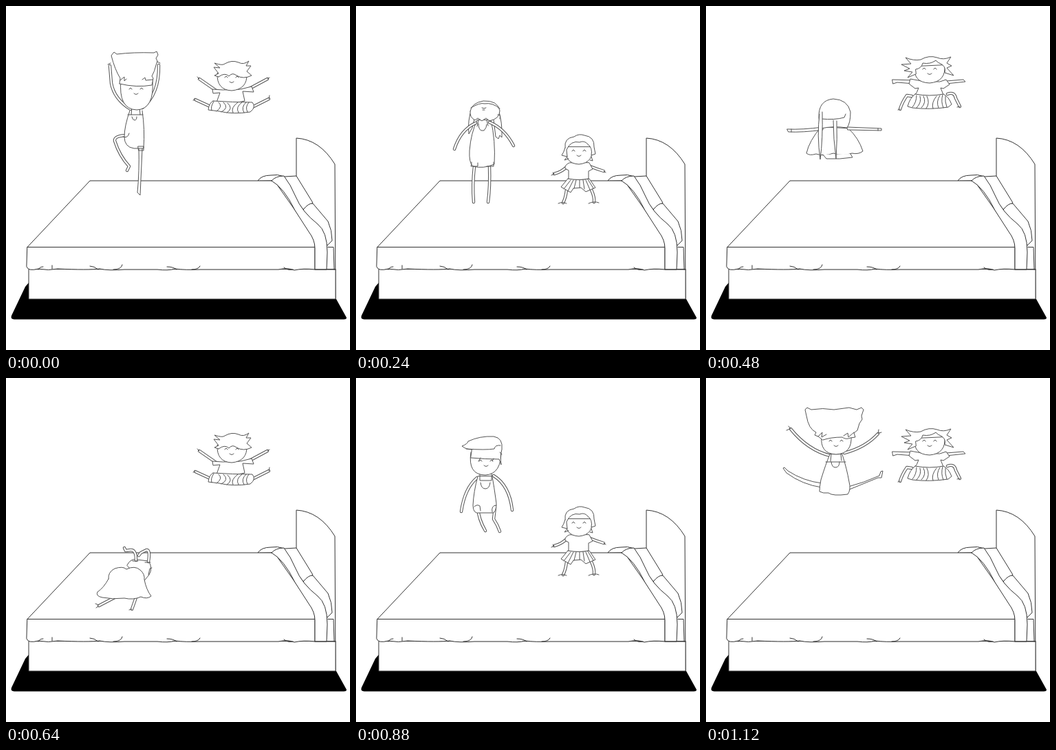
An HTML page with a canvas for the animation above (1200 ms loop, 500x500 px).

```html
<!DOCTYPE html>
<html>
<head>
<meta charset="utf-8">
<style>
html, body { margin: 0; width: 100%; height: 100%; overflow: hidden; background: #fff }
canvas { display: block }
</style>
</head>
<body>
<canvas id="stage" width="500" height="500"></canvas>
<script>
const ctx = document.getElementById('stage').getContext('2d');
ctx.lineCap = ctx.lineJoin = 'round';

// Line kinds: f = white shape, l = open line, t = tube (limb), e = smiling face at x y
const girl = {
  drop: `
t M181 150 Q157 135 153 112 L151 87
t M198 148 Q223 128 222 86
t M178 188 Q157 188 158 196 Q165 218 179 233 L176 239
f M193 207 Q194 240 191 271 L195 275 L198 207 Z
f M180 152 Q172 175 172 190 Q172 205 186 207 L200 207 Q202 180 198 152
l M183 147 L182 158 H195 L194 147 M177 158 H182 M195 158 H199 M183 161 q1 5 4 5 q3 0 3 -5 M170 190 Q177 193 179 185 M192 204 h8 v6 h-7 z
f M167 108 Q163 150 190 151 Q216 150 213 108 Z
f M165 113 L166 105 Q158 92 153 72 L157 67 L161 70 Q185 67 215 68 L219 66 L221 71 L218 76 L220 80 L218 86 Q216 95 212 102 L214 105 L212 115 Q190 119 165 113
l M166 108 L172 103 L172 109 L175 106 M198 107 L202 104 L203 108 L213 107 M152 83 l-4 2 M220 81 l4 2
e 189 120`,
  squat: `
t M164 269 Q142 268 131 254 L124 234
t M205 267 Q226 258 234 230
f M129 237 Q145 241 164 234 L166 250 Q145 255 130 246 Q138 242 129 237
f M206 232 Q213 237 222 237 Q214 240 213 244 L228 250 Q218 251 207 251 Z
t M164 289 Q154 286 156 296 Q161 305 165 317
t M204 289 Q212 288 209 298 L201 317
f M166 273 Q157 286 159 294 Q170 304 183 302 Q200 304 207 290 Q208 280 202 273 Z
l M174 268 v7 M196 268 v7 M153 320 q6 -3 15 0 M195 318 q8 -2 13 2 M160 294 q3 -5 8 -4 M206 292 q-4 -4 -9 -2
f M173 278 q9 -3 16 0 q2 4 -2 6 q-8 2 -13 -1 z
f M162 249 Q160 276 185 276 Q209 275 210 248 Q207 234 194 230 Q176 226 166 234 Q160 241 162 249
l M162 249 Q185 246 210 249 M177 240 L173 249 M190 241 L194 248 M122 232 l2 -2 M234 227 l2 2
e 185 252`,
  rise: `
f M207 150 Q213 170 212 191 L209 188 L207 193 L203 190 L200 165 Z
f M168 150 Q162 166 164 186 L169 177 L172 164 Z
t M172 233 Q169 260 171 285
t M194 233 Q195 262 192 285
f M176 166 Q167 185 165 210 Q164 228 170 233 Q185 237 201 230 Q203 195 196 166 Z
t M174 170 Q152 180 143 208
t M194 169 Q216 178 229 203
l M178 166 L176 175 M190 166 L192 174 M178 171 q0 8 4 10 h4 q4 -4 4 -9 M168 227 q0 5 -1 6 h10 v-5 M190 233 h10 v-6
f M166 153 Q168 141 185 138 Q206 137 209 152 Q209 164 194 167 L189 163 L183 167 L177 163 L173 166 Q165 162 166 153
l M167 148 Q180 140 187 142 Q198 140 209 149 M183 148 q3 2 6 0 M184 151 h3 M206 158 q5 -1 3 6`,
  flip: `
f M167 148 Q150 168 146 186 Q150 190 160 187 Q172 191 185 186 Q200 191 212 186 Q222 188 228 183 Q222 164 207 150 Z
f M170 188 L175 194 Q195 195 213 192 L210 187
f M118 151 Q140 152 170 148 L170 152 Q140 156 120 155 Z
f M205 148 L255 150 V153 L206 152 Z
f M164 134 Q163 109 185 107 Q206 108 210 126 Q210 142 205 149 Q185 146 167 150 Z
l M167 136 Q187 138 201 134 L203 129 M124 151 v4 M250 150 v3
f M165 129 Q161 160 166 195 Q170 165 169 126
f M185 138 Q185 165 189 194 Q191 165 190 139`,
  belly: `
f M176 272 Q181 262 190 264 L207 266 Q214 276 208 286 L199 297 Z
t M189 265 Q189 249 181 250 L174 251 L172 247
t M207 267 Q210 249 204 250 L196 254 L193 258
l M184 266 h8 M202 268 h8 M207 286 l2 -9 l3 -1
t M158 319 L135 331
t M189 319 L183 336
f M149 292 Q148 282 158 277 Q170 273 175 278 Q187 272 195 279 Q202 285 201 293 Q204 308 211 317 Q205 322 196 318 Q185 323 172 320 Q155 322 140 319 Q130 317 133 311 Q142 305 149 292
l M135 330 l-5 -2 M134 332 l-3 2 M183 336 l-4 1`,
  leap: `
t M176 145 Q158 160 153 194
t M200 142 Q223 156 227 192
t M177 188 Q178 205 188 222
t M202 188 L200 205 Q206 214 209 223
f M177 143 Q171 165 170 185 Q170 198 180 196 L200 196 Q206 190 203 175 Q201 160 198 143 Z
l M180 139 v10 H197 v-10 M181 152 q1 9 7 9 q6 0 7 -9 M172 187 q4 -4 8 -1 l1 7 M198 195 q-2 -10 6 -10
f M167 108 Q162 141 188 141 Q212 140 211 104 Z
f M168 104 Q160 104 154 99 Q162 96 163 92 Q180 84 200 85 Q214 87 212 104 Q209 112 211 126 L208 118 Q188 118 167 116 Z
l M160 103 Q188 105 201 103 Q202 97 210 98 M181 116 l-3 5 M200 117 l-2 4 M209 108 l3 3
e 189 120`,
  star: `
t M181 113 Q148 105 123 74
t M201 109 Q232 101 250 81
f M168 159 Q140 155 117 138 L112 131 L114 130 L119 135 Q142 150 169 153 Z
f M206 163 L250 145 L255 145 L257 135 L254 136 L252 142 Q230 152 207 158 Z
f M180 111 Q174 125 167 148 Q165 158 165 165 Q170 168 178 167 Q184 172 206 169 Q211 162 208 151 Q205 133 198 111 Z
l M182 111 L181 121 M196 111 L197 120 M174 122 H203 M182 122 q1 8 6 8 q6 0 6 -8 M123 74 l-3 -4 M122 74 l-5 2 M250 81 l1 -6 M251 80 l4 -1
f M168 84 Q165 110 189 111 Q213 110 211 84 Z
f M163 85 L158 83 L160 79 Q149 74 146 55 L144 46 L147 43 L153 46 Q170 43 186 46 L208 43 L219 46 L226 43 L229 46 L226 55 L227 60 L223 66 L220 76 L215 80 L217 86 L210 87 Q203 90 198 86 Q182 86 170 90 Z
l M163 85 L169 79 L168 86 L175 82 M200 84 L206 80 L207 86 L215 79
e 189 91`
};

const boy = {
  sit: `
t M307 124 L281 106
t M352 121 L380 106
t M299 147 L275 136
t M358 147 L382 135
f M315 122 L300 121 L301 127 L311 126 L306 140 Q328 143 347 138 L344 124 L360 125 L357 117 L341 121 Z
f M301 138 Q295 141 294 151 L310 153 Q330 158 355 154 Q364 147 358 140 Q330 140 301 138
l M302 139 Q297 146 299 152 M309 140 Q316 146 306 153 M316 140 Q325 148 313 154 M322 141 Q331 149 321 155 M337 140 Q326 148 330 155 M343 140 Q333 147 338 155 M349 140 Q341 147 346 155 M353 140 Q347 147 351 154 M275 136 l-3 1 M382 135 l1 -5 M281 106 l-3 -3 M380 106 l3 -2
f M307 98 Q306 122 328 123 Q351 121 350 99 Z
f M309 103 L303 101 L309 98 L302 89 L311 90 L303 83 Q315 87 318 84 Q328 78 338 82 Q345 86 353 80 L349 87 L356 87 L350 95 L357 101 Q345 107 335 101 Q329 96 324 102 Q318 96 309 103
e 328 103`,
  fall: `
t M308 163 Q294 155 291 133
t M348 163 Q360 153 361 134
f M303 206 L310 221 L309 205 Z
f M334 217 L338 242 L341 237 L339 217 Z
f M308 158 L302 162 L305 169 L311 170 L309 193 Q325 197 344 194 L342 170 L352 167 L348 158 Z
f M311 181 Q299 182 296 198 L301 207 Q318 204 330 204 L331 218 L344 217 L344 193 Q325 197 313 191 Z
l M303 184 Q308 195 302 206 M310 183 Q314 195 308 205 M315 193 L314 204 M321 195 L320 204 M327 195 L327 204 M333 195 L335 217 M338 195 L340 217 M296 192 l6 3 M295 200 l8 -4 M291 132 l-2 -3 M361 133 l1 -4
f M305 141 Q302 168 326 168 Q351 167 349 139 Z
f M305 147 L296 139 L301 138 L295 130 L302 131 L297 124 L308 128 L304 121 Q313 126 319 124 Q331 119 342 126 L350 123 L348 129 L355 130 L350 136 L354 145 L346 141 Q339 145 331 144 Q326 137 319 141 Q311 143 305 147
e 326 145`,
  stand: `
t M308 232 Q300 241 288 244
t M340 233 Q350 237 360 240
t M306 267 Q305 278 301 286
t M342 267 Q347 278 346 285
f M310 228 Q303 231 304 236 L309 239 L309 252 Q325 254 338 251 L338 240 L344 237 L339 228 Z
f M308 251 L298 263 L312 271 L316 265 L327 264 L334 270 L348 264 L339 251 Q325 254 308 251
l M312 253 L302 266 M316 253 L308 269 M320 253 L317 265 M325 253 V264 M330 253 L332 266 M334 253 L340 267 M337 252 L345 265 M294 287 q6 -3 12 0 M338 287 q8 -4 15 -1 M288 244 l-4 2 M288 244 l-2 -2 M360 240 l3 2
f M306 205 Q302 229 324 230 Q346 228 343 205 Z
f M304 206 Q302 192 317 190 Q324 185 332 188 Q347 190 346 205 L348 215 L342 217 Q344 206 337 201 Q332 195 325 198 Q312 195 306 209 L307 219 L299 217 Q302 213 304 206
l M307 219 L303 224 L309 222 M342 219 L344 225 L340 224
e 324 210`,
  hop: `
t M310 140 Q301 146 291 156
t M346 141 Q352 148 362 151
t M307 177 Q297 184 303 197
t M344 176 Q356 181 354 196
f M313 136 L304 140 L307 147 L314 146 L313 158 Q325 161 341 158 L341 146 L349 146 L347 138 L340 136 Z
f M313 158 L300 172 L316 182 L326 176 L335 181 L350 176 L341 158 Q325 161 313 158
l M316 159 L304 175 M320 160 L310 179 M324 160 L319 180 M328 160 V177 M332 160 L337 180 M337 159 L343 178 M302 197 l-2 0 M354 196 l-4 1 M291 156 l-1 3
f M306 112 Q302 137 326 138 Q351 137 348 112 Z
f M296 118 L292 115 L304 113 Q307 103 312 99 Q321 94 328 98 Q341 95 347 104 Q352 113 360 118 L350 121 L348 113 Q340 109 337 104 Q326 112 318 106 Q312 114 306 115 L305 120 Z
l M304 121 L296 127 L306 128 M350 121 L356 128 L347 127
e 326 116`,
  top: `
f M271 107 L302 108 V113 L278 111 L272 113 Z
f M349 109 L374 107 L377 110 L349 113 Z
t M299 131 L292 130 Q285 140 282 150
t M351 128 Q361 124 363 134 L369 146
f M313 109 L297 106 L295 113 L304 120 L309 119 Q307 126 303 130 Q325 134 345 129 L341 119 L345 120 L354 114 L349 107 L340 110 Z
f M304 128 Q296 134 293 146 L300 148 Q325 151 352 147 L357 143 Q353 132 345 128 Q325 132 304 128
l M306 130 Q306 140 300 147 M311 131 Q314 140 306 148 M316 131 Q321 140 313 148 M321 131 Q326 141 320 149 M335 131 Q327 141 330 149 M340 130 Q334 139 338 148 M344 129 Q341 139 345 148 M348 131 Q347 139 350 147 M282 150 l-3 1 M369 146 l-4 1
f M304 88 Q300 111 325 112 Q349 110 347 86 Z
f M305 99 L293 104 L300 96 L288 94 L296 91 L284 85 L298 84 L290 75 Q302 80 312 78 Q324 71 336 75 Q345 79 356 74 L350 83 L357 87 L350 90 L360 101 L347 97 Q349 89 343 85 Q336 82 334 79 Q326 85 315 83 Q313 91 305 92 Z
e 325 91`
};

const bed = `
f M422 247 V192 Q456 194 478 230 L479 426
f M33 383 V426 H479 V383 Z
f M366 254 Q371 246 385 246 Q394 244 405 248 L422 247 L446 286 L432 296 L400 254 Z
f M432 296 Q440 286 446 287 L468 313 Q474 326 474 341 L467 348 L455 325 Z
f M31 350.5 L122 254 H390 L449 338 V383 Q432 381 419 384 Q410 380 396 383 H283 Q260 384 246 382 Q235 385 220 383 H172 Q150 385 136 382 Q120 384 75 382 Q62 385 47 382 Q32 386 30 379 Z
l M31 350.5 H449 M47 383 q2 -4 7 -4 M67 377 v5 M122 378 q6 0 12 5 M156 383 q12 0 13 -7 M234 379 q9 0 14 4 M270 383 q10 0 12 -5 M404 380 q6 5 13 3
f M386 254 Q392 247 404 247 Q414 260 421 277 Q430 299 453 317 Q467 328 467 358 L466 383 H449 V352 Q449 340 440 328 L420 297 Q404 264 386 254
l M449 383 H479 M468 350.5 H476 L477 383`;

const girlTrack = [
  [0, 'drop', 0], [40, 'drop', 28], [80, 'squat', 0], [160, 'rise', 32],
  [240, 'rise', 0], [320, 'rise', -32], [400, 'flip', 0], [480, 'flip', 28],
  [520, 'flip', 75], [560, 'belly', -3], [640, 'belly', 0], [720, 'belly', -4],
  [800, 'leap', 62], [880, 'leap', 0], [920, 'leap', -12], [960, 'leap', -20],
  [1000, 'star', 8], [1040, 'star', 3], [1120, 'star', 0]
];
const boyTrack = [
  [0, 'sit', 0], [40, 'sit', 16], [80, 'fall', 0], [160, 'fall', 44],
  [240, 'stand', 0], [320, 'hop', 45], [400, 'hop', 0], [480, 'top', 0], [560, 'sit', -4]
];

const path = (d, color, width) => {
  ctx.strokeStyle = color;
  ctx.lineWidth = width;
  ctx.stroke(new Path2D(d));
};

function face(x, y, ink) {
  path(`M${x - 10} ${y + 1} q2 -4 4 0 M${x + 6} ${y + 1} q2 -4 4 0 M${x - 3} ${y + 7} q3 3 6 0`, ink, 1);
}

function draw(lines, ink, dy = 0) {
  ctx.save();
  ctx.translate(0, dy);
  for (const line of lines.trim().split('\n')) {
    const kind = line[0], d = line.slice(2);
    if (kind === 'e') face(...d.split(' ').map(Number), ink);
    else if (kind === 't') {
      path(d, ink, 4.4);
      path(d, '#fff', 2.4);
    } else {
      if (kind === 'f') ctx.fill(new Path2D(d));
      path(d, ink, 1);
    }
  }
  ctx.restore();
}

function drawActor(poses, track, t) {
  const [, pose, dy] = track.findLast(step => step[0] <= t);
  draw(poses[pose], '#555', dy);
}

function frame(now) {
  const t = now % 1200;
  ctx.fillStyle = '#fff';
  ctx.fillRect(0, 0, 500, 500);
  ctx.fillStyle = '#000';
  ctx.fill(new Path2D('M34 401 V426 H480 L495 453 Q495 455.5 491 455.5 H12 Q6 455 8 450 L28 408 Z'));
  ctx.fillStyle = '#fff';
  draw(bed, '#333');
  drawActor(girl, girlTrack, t);
  drawActor(boy, boyTrack, t % 640);
  requestAnimationFrame(frame);
}
requestAnimationFrame(frame);
</script>
</body>
</html>
```
